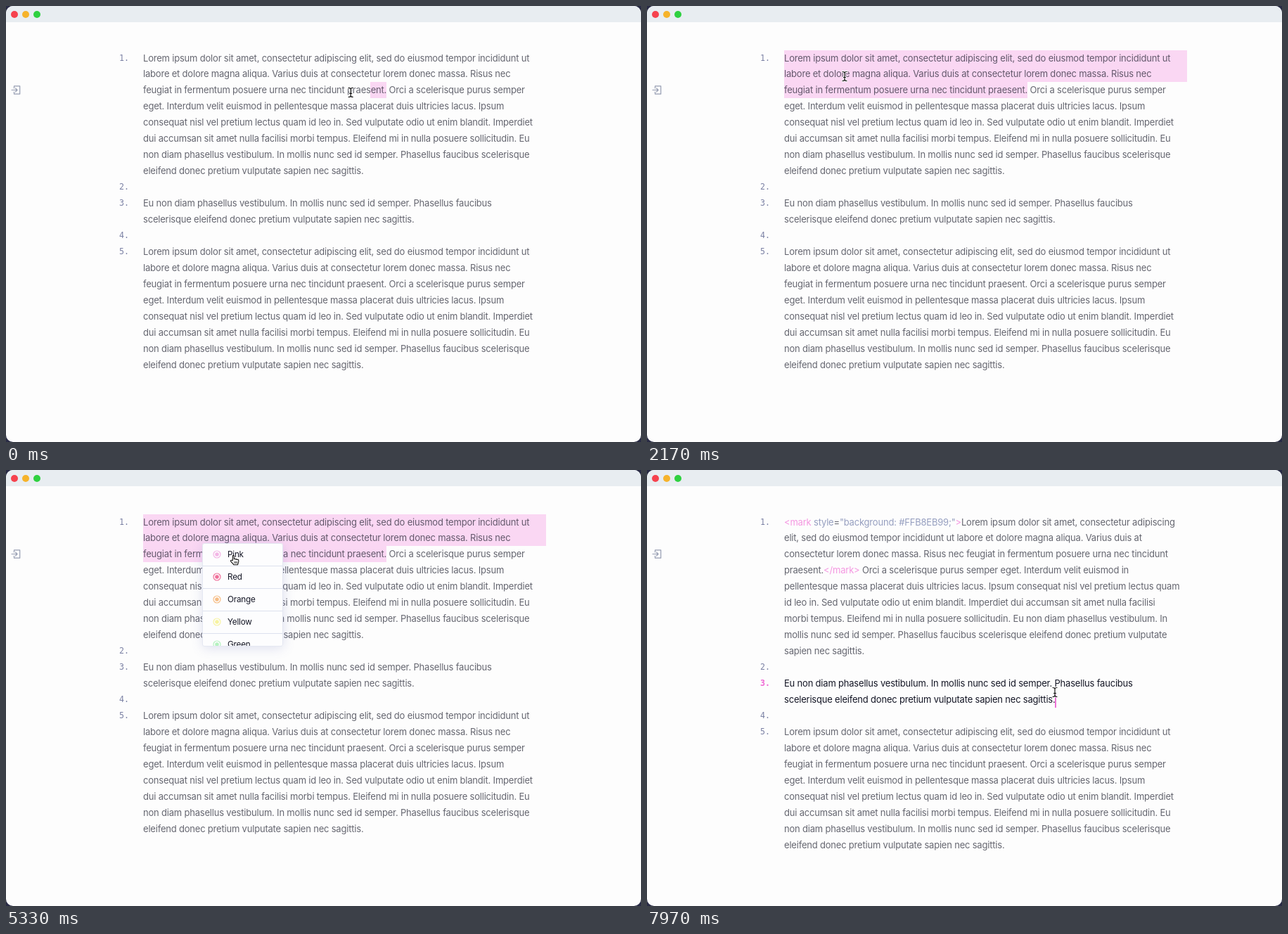
An HTML page that plays this animation: 903 px wide and 620 px high, repeating every 8 s.

```html
<!DOCTYPE html>
<html lang="en">
<head>
<meta charset="utf-8">
<title>Highlighting a selection</title>
<style>
html, body { margin: 0; width: 100%; height: 100%; overflow: hidden; background: #292b45; }
#window { position: relative; width: 903px; height: 620px; overflow: hidden; border-radius: 10px;
  background: #fdfdfd; font: 13px/22.96px Inter, "Liberation Sans", sans-serif; letter-spacing: -.2px; color: #141625; }
#window * { box-sizing: border-box; }
#bar { position: absolute; width: 100%; height: 23px; background: #e8edf1; }
#bar i { position: absolute; top: 7px; width: 10px; height: 10px; border-radius: 50%; }
.abs, .doc, .select, .caret { position: absolute; }
.doc { left: 195px; top: 62.5px; white-space: pre; }
.item { position: relative; }
.item .text { opacity: .65; min-height: 22.96px; }
.item.active .text { opacity: 1; }
.num { position: absolute; left: -34px; font: 11.6px/22.96px "DejaVu Sans Mono", monospace; letter-spacing: 0; color: #7b81a4; }
.active .num { color: #ef6ad4; font-weight: bold; }
.tag { color: #f05fd2; }
.attr { color: #5e6c9f; }
.select { height: 22.96px; background: #fad7f3; }
.caret { width: 2px; height: 22px; background: #ee72d6; }
svg { overflow: visible; fill: none; stroke: currentColor; stroke-linecap: round; stroke-linejoin: round; }
#menu { left: 281px; top: 101px; width: 201px; height: 399px; padding-top: 7.9px; border-radius: 4px;
  background: #e8eef0; box-shadow: 0 2px 6px #33406b40; font-size: 12.2px; line-height: 26.2px; letter-spacing: -.18px; }
#menu div { position: relative; height: 26.2px; padding-left: 38px; white-space: pre; }
#menu hr { height: 1px; margin: 8px 11px 8.3px; border: 0; background: #d9e5e8; }
#menu svg { position: absolute; left: 14px; top: 5px; width: 13px; height: 13px; color: #5b649a; stroke-width: 2; }
#menu .hover svg { color: #10121c; }
#popup { left: 279px; top: 103.5px; width: 115px; height: 147px; overflow: hidden; border: 1px solid #e5e8f2; border-radius: 3px;
  background: #fdfdfe; font-size: 11.7px; line-height: 31px; }
#popup div { position: relative; height: 32px; padding-left: 35px; border-bottom: 1px solid #dce1ee; }
#popup svg { position: absolute; left: 14px; top: 9px; width: 12px; height: 12px; }
#glow { left: 280px; top: 104px; width: 114px; height: 146px; box-shadow: 0 3px 16px #5a64b433; }
#cursor { left: 0; top: 0; width: 1px; height: 1px; }
</style>
</head>
<body>
<div id="window">
  <div id="bar">
    <i style="left:7px;background:#f6424e"></i><i style="left:23px;background:#f6b32b"></i><i style="left:39px;background:#2fd140"></i>
  </div>
  <svg class="abs" style="left:8px;top:113px;color:#969db2" width="13" height="13" stroke-width="1.2">
    <path d="M3.5 4V.8H11.7V12.2H3.5V9M0 6.5H8M5.5 4L8 6.5L5.5 9"/>
  </svg>
  <div class="select"></div><div class="select"></div><div class="select"></div>
  <div class="doc" id="before"></div>
  <div class="doc" id="after"></div>
  <div class="caret" id="caret"></div>
  <div class="abs" id="menu"></div>
  <div class="abs" id="glow"></div>
  <div class="abs" id="popup"></div>
  <svg class="abs" id="cursor">
    <g id="beam">
      <path id="beamShape" stroke="#fff" stroke-width="2.8" d="M-3 -6.5Q0 -6.5 0 -4.5Q0 -6.5 3 -6.5M0 -5V5M-3 6.5Q0 6.5 0 4.5Q0 6.5 3 6.5M-1.5 1.5H1.5"/>
      <path id="beamInk" stroke="#111" stroke-width="1.2"/>
    </g>
    <g id="hand" transform="translate(-5 0)" stroke="#111" stroke-width="1.1">
      <path fill="#fff" d="M4 8V2Q4 .7 5 .7Q6 .7 6 2V6Q7 5 8 6.3Q9 5.4 10 6.7Q12.4 6 12.4 8V10L11.2 14H5.5L1.3 9.3Q.7 7.5 2.3 7.6Z"/>
      <path stroke-width=".8" d="M6.5 9.5V12M8.3 9.5V12M10 9.5V12"/>
    </g>
  </svg>
</div>
<script>
const $ = id => document.getElementById(id);
const show = (el, on) => { el.style.display = on ? "" : "none"; };

const LOREM = `Lorem ipsum dolor sit amet, consectetur adipiscing elit, sed do eiusmod tempor incididunt ut
labore et dolore magna aliqua. Varius duis at consectetur lorem donec massa. Risus nec
feugiat in fermentum posuere urna nec tincidunt praesent. Orci a scelerisque purus semper
eget. Interdum velit euismod in pellentesque massa placerat duis ultricies lacus. Ipsum
consequat nisl vel pretium lectus quam id leo in. Sed vulputate odio ut enim blandit. Imperdiet
dui accumsan sit amet nulla facilisi morbi tempus. Eleifend mi in nulla posuere sollicitudin. Eu
non diam phasellus vestibulum. In mollis nunc sed id semper. Phasellus faucibus scelerisque
eleifend donec pretium vulputate sapien nec sagittis.`;
const BRIEF = `Eu non diam phasellus vestibulum. In mollis nunc sed id semper. Phasellus faucibus
scelerisque eleifend donec pretium vulputate sapien nec sagittis.`;
const MARKED = `<span class="tag">&lt;mark</span> <span class="attr">style</span>=<span class="attr">"background: #FFB8EB99;"</span><span class="tag">&gt;</span>Lorem ipsum dolor sit amet, consectetur adipiscing
elit, sed do eiusmod tempor incididunt ut labore et dolore magna aliqua. Varius duis at
consectetur lorem donec massa. Risus nec feugiat in fermentum posuere urna nec tincidunt
praesent.<span class="tag">&lt;/mark&gt;</span> Orci a scelerisque purus semper eget. Interdum velit euismod in
pellentesque massa placerat duis ultricies lacus. Ipsum consequat nisl vel pretium lectus quam
id leo in. Sed vulputate odio ut enim blandit. Imperdiet dui accumsan sit amet nulla facilisi
morbi tempus. Eleifend mi in nulla posuere sollicitudin. Eu non diam phasellus vestibulum. In
mollis nunc sed id semper. Phasellus faucibus scelerisque eleifend donec pretium vulputate
sapien nec sagittis.`;

const listHtml = items => items.map((text, i) =>
  `<div class="item"><span class="num">${i + 1}.</span><div class="text">${text}</div></div>`).join("");
$("before").innerHTML = listHtml([LOREM, "", BRIEF, "", LOREM]);
$("after").innerHTML = listHtml([MARKED, "", BRIEF, "", LOREM]);

const SEARCH = "M9 3a6 6 0 1 0 .01 0M14 13L21 21";
const CLIP = "M8 2H16V6H8Z";
const MENU = [
  ["Insert Chart", "M21 12A9 9 0 1 1 12 3V12H21A9 9 0 0 0 12 3"],
  ["Show Synonyms", "M12 7V20M2 4H8Q12 4 12 7Q12 4 16 4H22V19H15Q12 19 12 21Q12 19 9 19H2Z"],
  ["Look up", "M3 5H9V11Q9 16 4 18Q6 15 6 12H3ZM14 5H20V11Q20 16 15 18Q17 15 17 12H14Z", 'fill="currentColor"'],
  ["Search on Quarlo", SEARCH],
  ["Search on Lorebasin", SEARCH],
  ["Search on Vidmoor", SEARCH],
  ["Highlight", "M4 21H20M6 17L8 11L17 3L21 7L12 15ZM8 11L12 15"],
  ["Unhighlight", "M3 14L14 4L21 11L11 20H8ZM8 9L15 16"],
  ["Extract current selection...", "M1 12H8L14 5H22M8 12L14 19H22M19 2L22 5L19 8M19 16L22 19L19 22"],
  null,
  ["Cut", "M6 3a3 3 0 1 0 .01 0M6 15a3 3 0 1 0 .01 0M8 8L21 19M8 16L21 5"],
  ["Copy", "M8 2H22V15H8ZM8 8H2V22H15V15"],
  ["Paste", "M4 4H20V22H4Z" + CLIP],
  ["Paste as plain text", "M20 9V4H4V21H9M11 11H21V21H11Z" + CLIP],
  ["Select all", "M2 2H22V22H2ZM8 8H16V16H8Z", 'stroke-dasharray="2.5 3.5"'],
];
$("menu").innerHTML = MENU.map(item => item
  ? `<div><svg viewBox="0 0 24 24"><path d="${item[1]}" ${item[2] || ""}/></svg>${item[0]}</div>` : "<hr>").join("");

const COLORS = { Pink: "#f3b6e6", Red: "#f0709a", Orange: "#f6bd85", Yellow: "#f7f3a0", Green: "#b5f2c0" };
$("popup").innerHTML = Object.entries(COLORS).map(([name, color]) =>
  `<div><svg style="color:${color}"><circle cx="6" cy="6" r="5" stroke-width="1.2"/><circle cx="6" cy="6" r="2.8" fill="${color}" stroke="none"/></svg>${name}</div>`).join("");
$("beamInk").setAttribute("d", $("beamShape").getAttribute("d"));

const LOOP = 8000, LINE = 22.96, TOP = 62.5, LEFT = 195, ROW = 26.2;
const RELEASE = 1400, MENU_OPEN = 2450, MENU_PICK = 4350, COLOR_PICK = 5500, CLICK = 7700;

// Pointer path: time, x, y
const PATH = [
  [-50, 526, 123], [0, 491, 123], [200, 325, 112], [380, 228, 101], [550, 192, 96], [900, 192, 96],
  [1030, 192, 87], [1070, 193, 82], [1200, 194, 74], [1500, 200, 76], [2100, 281, 100], [2600, 281, 100],
  [3400, 333, 282], [3670, 329, 287], [4350, 327, 279], [4500, 327, 278], [5000, 324, 122],
  [5500, 323, 120], [6800, 323, 120], [7600, 580, 316], [8000, 580, 316],
];
function pointer(t) {
  const i = PATH.findIndex(p => p[0] > t);
  const [t0, x0, y0] = PATH[i - 1], [t1, x1, y1] = PATH[i];
  const k = (t - t0) / (t1 - t0);
  return [x0 + (x1 - x0) * k, y0 + (y1 - y0) * k];
}

function drawSelection(t) {
  // The selection trails the pointer slightly
  const [x, y] = pointer(Math.min(t, RELEASE) - 40);
  const line = t < RELEASE ? Math.max(0, Math.floor((y - TOP) / LINE)) : 0;
  const start = t < RELEASE && line > 0 ? Math.max(LEFT, x) : LEFT;
  document.querySelectorAll(".select").forEach((box, i) => {
    const left = i === line ? start : LEFT, right = i === 2 ? 541 : 768;
    show(box, t < COLOR_PICK && i >= line);
    box.style.left = left + "px";
    box.style.top = TOP + i * LINE + "px";
    box.style.width = right - left + "px";
  });
}

function draw(t) {
  const [x, y] = pointer(t);
  const edited = t >= COLOR_PICK, moved = t >= CLICK;
  const menuOpen = t >= MENU_OPEN && t < MENU_PICK;
  const popupOpen = t >= MENU_PICK && t < COLOR_PICK;

  drawSelection(t);
  show($("before"), !edited);
  show($("after"), edited);
  [...$("after").children].forEach((item, i) => item.classList.toggle("active", i === (moved ? 2 : 0)));

  show($("caret"), edited && (t - (moved ? CLICK : COLOR_PICK)) % 1200 < 600);
  $("caret").style.left = (moved ? 580 : 301) + "px";
  $("caret").style.top = (moved ? 316 : 132) + "px";

  show($("menu"), menuOpen);
  const hovered = x > 284 ? Math.floor((y - 108.9) / ROW) : -1;
  [...$("menu").children].forEach((row, i) => row.classList.toggle("hover", i === hovered));
  show($("popup"), popupOpen);
  show($("glow"), popupOpen);

  const pointing = menuOpen && x > 282 || popupOpen && y < 250;
  show($("hand"), pointing);
  show($("beam"), !pointing);
  $("cursor").style.transform = `translate(${x}px, ${y}px)`;
}

const begin = performance.now();
function tick() {
  draw((performance.now() - begin) % LOOP);
  requestAnimationFrame(tick);
}
tick();
</script>
</body>
</html>
```
